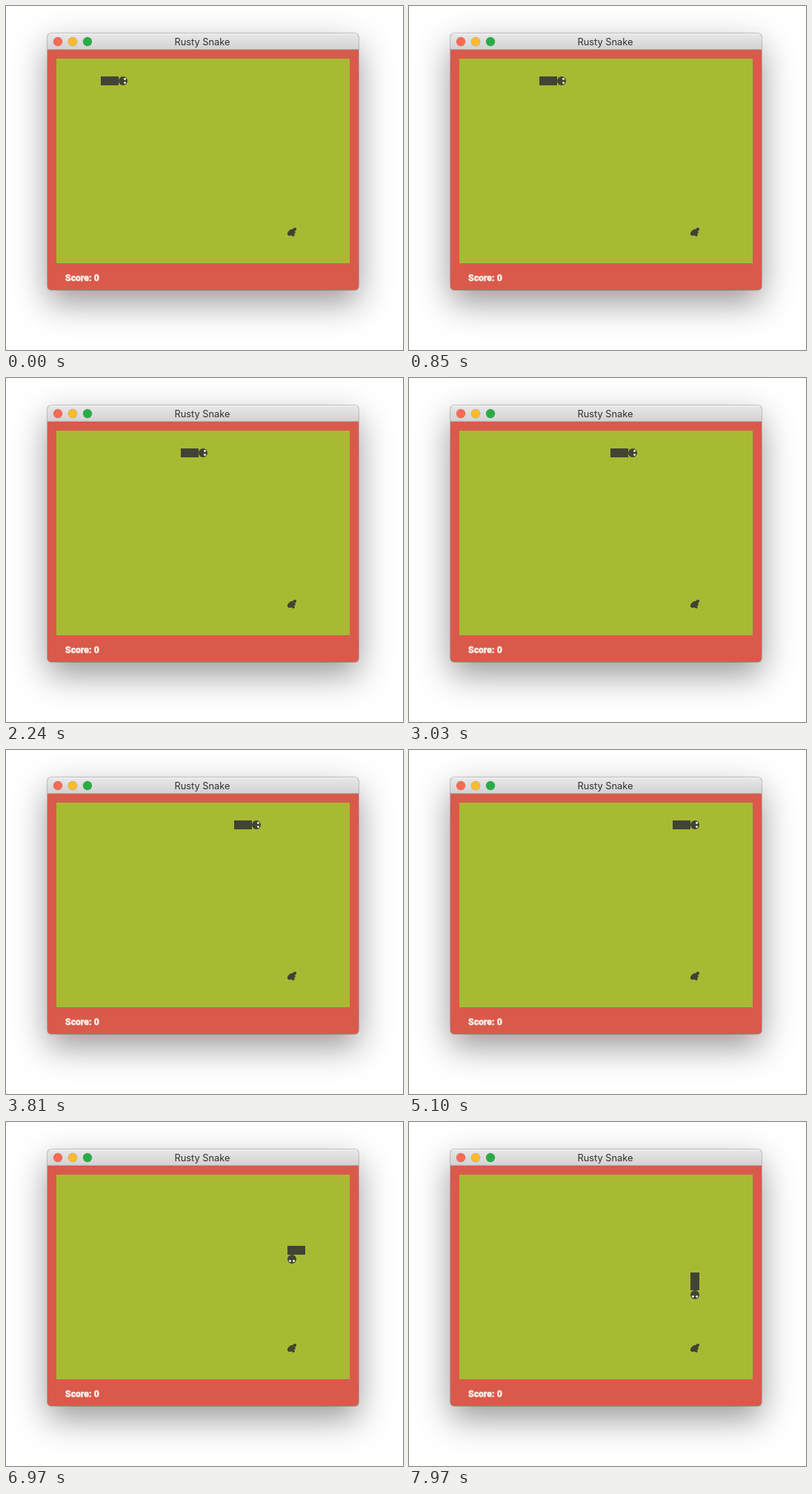
An HTML page for the animation above (8000 ms loop, 536 by 464 pixels).

```html
<!DOCTYPE html>
<html lang="en">
<head>
<meta charset="utf-8">
<title>Rusty Snake</title>
<style>
  html, body { margin: 0; width: 100%; height: 100%; overflow: hidden; background: #fff; }
  .window {
    position: absolute; left: 56px; top: 37px; width: 420px; height: 346px;
    border-radius: 5px; overflow: hidden; background: #d95a4b;
    box-shadow: 0 0 0 1px rgba(0,0,0,.2), 0 17px 46px rgba(0,0,0,.41);
  }
  .bar {
    height: 21px; border-bottom: 1px solid #b8b0ae;
    background: linear-gradient(#e9e9e9, #d2d2d2); box-shadow: inset 0 1px #f4f4f4;
  }
  svg { position: absolute; left: 0; top: 0; }
</style>
</head>
<body>
<div class="window"><div class="bar"></div></div>
<svg width="536" height="464" viewBox="0 0 536 464">
  <g stroke-opacity=".12" stroke="#000">
    <circle cx="70" cy="48" r="6" fill="#fb6a55"/>
    <circle cx="90" cy="48" r="6" fill="#fdbb2d"/>
    <circle cx="110" cy="48" r="6" fill="#27ae43"/>
  </g>
  <text x="265" y="53" text-anchor="middle" font-family="Inter, sans-serif" font-size="12.8" fill="#303030">Rusty Snake</text>
  <rect x="68" y="71" width="396" height="276" fill="#a8ba33"/>
  <text x="80" y="371" font-family="Roboto, sans-serif" font-weight="900" font-size="12.2" fill="#fbf3ea" stroke="#fbf3ea" stroke-width=".4">Score: 0</text>
  <g fill="#414433">
    <path d="M380 306L382 303L385 301L387 301L389 299L392 299.5V302L390 304L391 306L389 307.5L390 309.5L388 311L385.5 309.5L382 310L380 308.5Z"/>
    <rect class="body" width="12" height="12"/>
    <rect class="body" width="12" height="12"/>
    <g id="head">
      <circle r="6"/>
      <g fill="#fff">
        <circle cx="2.5" cy="-2.6" r="1.4"/>
        <circle cx="2.5" cy="2.6" r="1.4"/>
      </g>
    </g>
  </g>
</svg>
<script>
const LOOP = 8000, TICK = 98.5, DELAY = 60, CELL = 12, LEFT = 68, TOP = 71;
const TURN_TICK = 52;
const DIRS = { R: [1, 0, 0], D: [0, 1, 90], L: [-1, 0, 180] };
const across = 'R'.repeat(20);
const moves = across + 'DDDDDDLDDDDD';

const path = [[5, 2, 0], [6, 2, 0], [7, 2, 0]];
for (const m of moves) {
  const [x, y] = path[path.length - 1], [dx, dy, angle] = DIRS[m];
  path.push([x + dx, y + dy, angle]);
}

const body = document.querySelectorAll('.body');
const head = document.getElementById('head');

// Three moves per eight ticks going across, then two per five;
// the key press at the turn adds a move to the last step across.
function movesAt(t) {
  const tick = Math.floor((t - DELAY) / TICK);
  return tick < TURN_TICK
    ? Math.min(across.length - 1, Math.floor(tick * 3 / 8) + 1)
    : Math.min(moves.length, across.length + 1 + Math.floor((tick - TURN_TICK) * 2 / 5));
}

function draw(t) {
  const done = movesAt(t);
  body.forEach((part, i) => {
    const [x, y] = path[done + i];
    part.setAttribute('x', LEFT + x * CELL);
    part.setAttribute('y', TOP + y * CELL);
  });
  const [x, y, angle] = path[done + 2];
  head.setAttribute('transform',
    `translate(${LEFT + (x + .5) * CELL} ${TOP + (y + .5) * CELL}) rotate(${angle})`);
}

const start = performance.now();
function loop() {
  draw((performance.now() - start) % LOOP);
  requestAnimationFrame(loop);
}
loop();
</script>
</body>
</html>
```
